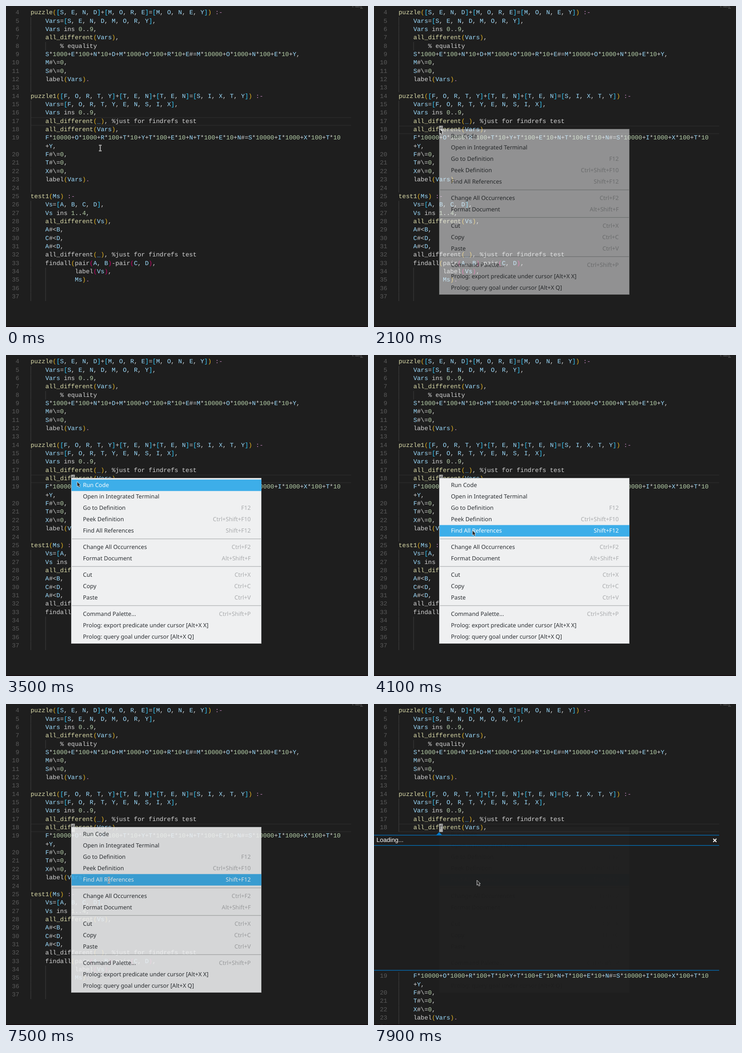
An HTML page that plays this animation: 795x705 px, repeating every 8 s.

```html
<!DOCTYPE html>
<html>
<head>
<meta charset="utf-8">
<style>
html, body { margin: 0; width: 100%; height: 100%; overflow: hidden; background: #1e1e1e; }
svg { display: block; }
/* The tiny rotation keeps baselines from snapping to whole pixels. */
text { white-space: pre; text-rendering: geometricPrecision; fill: #d4d4d4;
  font: 13.5px "Liberation Mono", monospace; transform: rotate(.002deg); }
.sans { font-family: "Liberation Sans", sans-serif; }
.menu text { font: 12.6px "Noto Sans", sans-serif; fill: #2a2e32; }
.menu .key { fill: #a9abad; text-anchor: end; }
.menu .on text { fill: #fcfcfc; }
.menu .on rect { fill: #3daee9; }
.num { fill: #5a5a5a; text-anchor: end; }
.guide { fill: #404040; }
.tiny { font-size: 4px; fill: #888; }
</style>
</head>
<body>
<svg id="stage" width="795" height="705" viewBox="0 0 795 705"></svg>
<script>
const LEFT = 54, CHAR = 8.1, ROW = 18.35, TOP = 5.75, BASE = 12.4;
const WHITE = '#d4d4d4', NAME = '#dcdcaa', VAR = '#9cdcfe', NUM = '#b5cea8', KEY = '#c586c0';
const ROUND = ['#e6b422', '#c70067'], SQUARE = '#33ccff';

const code = String.raw`
puzzle([S, E, N, D]+[M, O, R, E]=[M, O, N, E, Y]) :-
    Vars=[S, E, N, D, M, O, R, Y],
    Vars ins 0..9,
    all_different(Vars),
        % equality
    S*1000+E*100+N*10+D+M*1000+O*100+R*10+E#=M*10000+O*1000+N*100+E*10+Y,
    M#\=0,
    S#\=0,
    label(Vars).

puzzle1([F, O, R, T, Y]+[T, E, N]+[T, E, N]=[S, I, X, T, Y]) :-
    Vars=[F, O, R, T, Y, E, N, S, I, X],
    Vars ins 0..9,
    all_different(_), %just for findrefs test
    all_different(Vars),
    F*10000+O*1000+R*100+T*10+Y+T*100+E*10+N+T*100+E*10+N#=S*10000+I*1000+X*100+T*10
    +Y,
    F#\=0,
    T#\=0,
    X#\=0,
    label(Vars).

test1(Ms) :-
    Vs=[A, B, C, D],
    Vs ins 1..4,
    all_different(Vs),
    A#<B,
    C#<D,
    A#<D,
    all_different(_), %just for findrefs test
    findall(pair(A, B)-pair(C, D),
            label(Vs),
            Ms).

`.split('\n');

const esc = s => s.replace(/&/g, '&amp;').replace(/</g, '&lt;');
const span = (s, fill) => `<tspan fill="${fill}">${esc(s)}</tspan>`;
const text = (x, y, body, cls = '') => `<text class="${cls}" x="${x}" y="${y}">${body}</text>`;
const rect = (x, y, w, h, fill, more = '') =>
  `<rect x="${x}" y="${y}" width="${w}" height="${h}" fill="${fill}" ${more}/>`;

let depth = 0;
function paint(line, lineNo) {
  return line.replace(/%.*|[A-Z]\w*|_|\d+|[a-z]\w*|[()\[\]]|:-|\.$|[^]/g, s => {
    let fill = WHITE;
    if (s == '(') fill = ROUND[depth++];
    else if (s == ')') fill = ROUND[--depth];
    else if (/[\[\]]/.test(s)) fill = SQUARE;
    else if (s == ':-' || s == '.' && line.endsWith(').')) fill = KEY;
    else if (/^[A-Z]/.test(s)) fill = VAR;
    else if (s == '_') fill = '#569cd6';
    else if (/^\d/.test(s)) fill = NUM;
    else if (/^(puzzle|test|all_)/.test(s) && lineNo != 32) fill = NAME;
    return span(s, fill);
  });
}

// Lines up to 18 stay put; the rest move down when the peek panel opens.
let upper = '', lower = '';
code.forEach((line, i) => {
  const row = i - 1, wrapped = row == 16;
  const lineNo = row > 15 ? row + 3 : row + 4;
  const y = TOP + row * ROW, base = y + BASE;
  const indent = line.search(/\S/);
  let out = '';
  const guides = lineNo < 4 || indent == 0 ? 0 : lineNo == 8 || lineNo > 33 ? 2 : 1;
  for (let g = 0; g < guides; g++)
    out += `<rect class="guide" x="${LEFT + g * 4 * CHAR}" y="${y}" width="1" height="${ROW}"/>`;
  if (!wrapped) out += text(29.2, base, lineNo, 'num');
  if (indent >= 0) out += text(LEFT + indent * CHAR, base, paint(line.trim(), lineNo));
  if (row < 15) upper += out; else lower += out;
});

// Hover popup
const hoverCode = [
  span('all_different', NAME) + '(+' + span('Vars', VAR) + ').',
  span('Like', NAME) + ' all_distinct/' + span('1', NUM) + ',  but with weaker propagation. Conside',
  'r using all_distinct/' + span('1', NUM) + '  instead, since all_distinct/' + span('1', NUM) + '  is',
  ' typically acceptably efficient and propagates much more s',
  'trongly.'];
const popup = rect(87, 86.5, 483.5, 177.5, '#2d2d30', 'stroke="#454545"') +
  [112, 139, 165].map(y => rect(87, y, 483, 1, '#404043')).join('') +
  text(92, 104, 'bounds:all_different/1', 'sans') +
  text(92, 129.1, span('all_different', NAME) + "('Param1')") +
  text(92, 157, 'clpfd:all_different/1', 'sans') +
  hoverCode.map((s, i) => text(92, 181.8 + i * 18.1, s)).join('');

// Context menu: centre, label, shortcut
const items = [
  [286, 'Run Code'], [311, 'Open in Integrated Terminal'],
  [336, 'Go to Definition', 'F12'], [361, 'Peek Definition', 'Ctrl+Shift+F10'],
  [386, 'Find All References', 'Shift+F12'],
  [421.6, 'Change All Occurrences', 'Ctrl+F2'], [446.8, 'Format Document', 'Alt+Shift+F'],
  [482.8, 'Cut', 'Ctrl+X'], [508, 'Copy', 'Ctrl+C'], [533, 'Paste', 'Ctrl+V'],
  [568.5, 'Command Palette...', 'Ctrl+Shift+P'],
  [593.5, 'Prolog: export predicate under cursor [Alt+X X]'],
  [618.6, 'Prolog: query goal under cursor [Alt+X Q]']];
const menu = rect(143.5, 270.5, 417, 363, '#eff0f1', 'stroke="#bcbebf"') +
  [403.2, 463.8, 549.8].map(y => rect(145, y, 415, 1.3, '#b0b2b4')).join('') +
  items.map(([y, label, key = '']) => `<g class="item">${rect(144, y - 12.5, 417, 25.2, 'none')}` +
    text(169, y + 4.4, label) + text(537.5, y + 4.4, key, 'key') + '</g>').join('');

const panel = rect(0, 287.5, 758, 298, '#1e1e1e') +
  [287.5, 310, 584.3].map(y => rect(0, y, 758, 1.2, '#007acc')).join('') +
  '<path d="M136.5 288L143 281.5L149.5 288Z" fill="#007acc"/>' +
  '<path d="M745 296l7 7m0-7l-7 7" stroke="#fff" stroke-width="2"/>' +
  text(5.5, 303, span('Loading...', '#fff'), 'sans');

const beam = 'M-3 -6.2H-1.2L0 -5.2L1.2 -6.2H3M0 -5.2V5.2M-3 6.2H-1.2L0 5.2L1.2 6.2H3';
const arrow = 'M0 0V11L2.5 9L4.3 12.8L6.6 11.7L5.2 8L7.6 7.4Z';
const group = (id, body, cls = '') => `<g id="${id}" class="${cls}">${body}</g>`;

stage.innerHTML =
  group('lineBox', rect(LEFT, 0, 704, 1.5, '#2a2a2a') + rect(LEFT, 16.8, 704, 1.5, '#2a2a2a')) +
  group('word', rect(86.4, 262.7, 13 * CHAR, ROW, '#202a35')) +
  upper + group('low', lower) +
  group('block', rect(143.1, 262.9, CHAR, 18.2, '#aeafad') +
    text(LEFT + 11 * CHAR, TOP + 14 * ROW + BASE, span('f', '#515052'))) +
  text(760, 3, 'S:-module', 'tiny') + text(778, 5.5, 'ab.', 'tiny') +
  rect(0, 703.4, 795, 1.6, '#170d10') +
  group('peek', panel) + group('hover', popup) + group('context', menu, 'menu') +
  group('mouse',
    group('ibeam', `<path d="${beam}" fill="none" stroke="#e4e4e4" stroke-width="2.2"/>` +
      `<path d="${beam}" fill="none" stroke="#333" stroke-width=".7"/>`) +
    group('pointer', `<path d="${arrow}" fill="#2b2b2b" stroke="#e8e8e8" stroke-width=".9"/>`));

const el = id => document.getElementById(id);
const rows = [...document.querySelectorAll('.item')];
const show = (id, alpha) => el(id).setAttribute('opacity', +alpha);
const move = (id, x, y) => el(id).setAttribute('transform', `translate(${x} ${y})`);

// Linear interpolation over [time, value, ...] keys
function track(keys, t) {
  const i = keys.findIndex(k => k[0] > t);
  if (i < 0) return keys[keys.length - 1].slice(1);
  if (i == 0) return keys[0].slice(1);
  const a = keys[i - 1], b = keys[i], p = (t - a[0]) / (b[0] - a[0]);
  return a.slice(1).map((v, j) => v + (b[j + 1] - v) * p);
}
const path = [[0, 207, 312], [800, 146, 273], [1500, 146, 273], [1700, 145, 271],
  [2000, 145, 271], [2100, 144, 270], [3400, 144, 270], [3500, 156, 278], [4200, 226, 403],
  [4300, 226, 403], [4600, 223, 383], [5100, 223, 383], [5300, 226, 387]];
const menuFade = [[2000, 0], [2100, .55], [2200, 1], [7400, 1], [7500, .88], [7600, .6],
  [7700, .3], [7800, .1], [7900, .01]];

function draw(now) {
  const t = Math.floor(now % 8000 / 100) * 100;
  const [x, y] = track(path, t);
  const clicked = t >= 2000, open = t >= 7700;
  const isBeam = t < 2100 || t >= 7500 && !open;
  move('mouse', x, y);
  show('ibeam', isBeam);
  show('pointer', !isBeam);
  move('lineBox', 0, TOP + (clicked ? 14 : 13) * ROW + .2);
  show('block', clicked);
  show('word', t >= 1100 && !clicked);
  show('hover', clicked || t < 1100 ? 0 : t < 1200 ? .5 : 1);
  show('context', track(menuFade, t)[0]);
  rows.forEach((r, i) => r.classList.toggle('on', t > 2100 && Math.abs(y - items[i][0]) < 12.6));
  show('peek', open);
  move('low', 0, open ? 308 : 0);
  requestAnimationFrame(draw);
}
draw(0);
</script>
</body>
</html>
```
